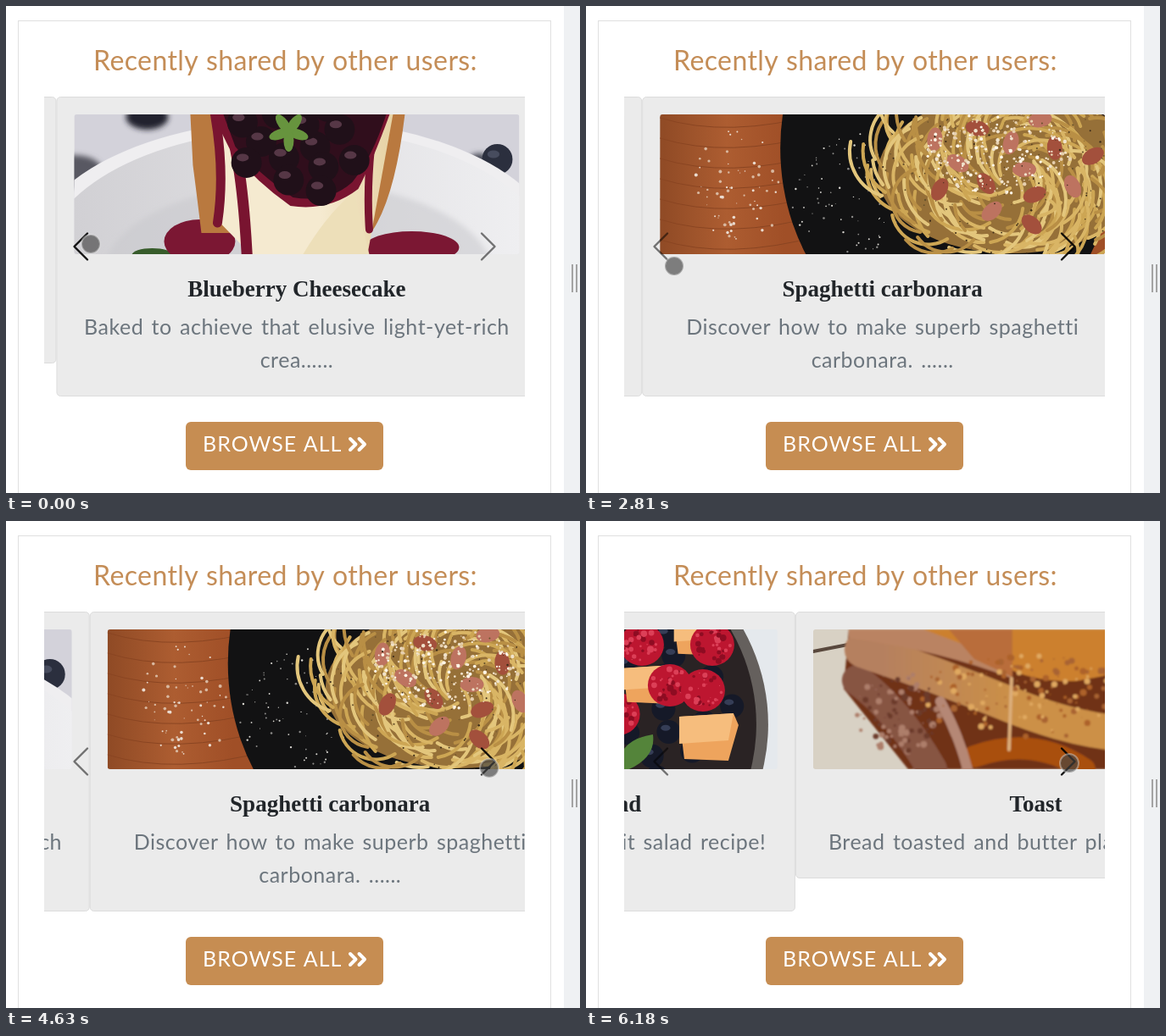
Animation of 677 by 575 pixels, one loop 6260 ms. Source, as an HTML page:

```html
<!DOCTYPE html>
<html lang="en">
<head>
<meta charset="utf-8">
<title>Recipe carousel</title>
<style>
  html, body { margin: 0; width: 100%; height: 100%; overflow: hidden; background: #fff; }
  svg { display: block; }
  text { font-family: Lato, sans-serif; }
  .middle { text-anchor: middle; }
  .heading { font-size: 32px; letter-spacing: .4px; word-spacing: 1px; fill: #c48d57; }
  .title { font: bold 27px "Liberation Serif", serif; fill: #212529; }
  .line { font-size: 25px; letter-spacing: .5px; word-spacing: 2.5px; fill: #6c757d; }
  .browse { font-size: 25px; letter-spacing: 1px; word-spacing: 1px; fill: #fff; }
  .chevron { fill: none; stroke: #000; stroke-width: 2.4; stroke-linecap: round; stroke-linejoin: round; }
</style>
</head>
<body>
<svg width="677" height="575" viewBox="0 0 677 575">
  <defs>
    <clipPath id="photo"><rect width="525" height="165" rx="3"/></clipPath>
    <filter id="soft"><feGaussianBlur stdDeviation="3"/></filter>
    <filter id="slight"><feGaussianBlur stdDeviation="1.2"/></filter>
    <linearGradient id="plate"><stop stop-color="#cfced2"/><stop offset="1" stop-color="#f1f1f3"/></linearGradient>
    <linearGradient id="cream"><stop offset=".6" stop-color="#f5ead0"/><stop offset="1" stop-color="#e6d2a4"/></linearGradient>
    <linearGradient id="wood"><stop stop-color="#8f4a25"/><stop offset=".15" stop-color="#ad5d31"/><stop offset=".28" stop-color="#a04f27"/></linearGradient>
    <linearGradient id="bread" gradientUnits="userSpaceOnUse" x2="400"><stop offset=".2" stop-color="#b5805f"/><stop offset=".6" stop-color="#cc9047"/></linearGradient>
  </defs>
  <rect x="658" width="19" height="575" fill="#eff1f3"/>
  <path d="M668 305v33M673 305v33" stroke="#a3a3a3" stroke-width="2"/>
  <rect id="panel" x="14.5" y="17.5" width="628" fill="none" stroke="#e0e0e0"/>
  <text class="heading middle" x="329.5" y="76">Recently shared by other users:</text>
  <svg id="carousel" x="45" y="107" width="567" height="354"></svg>
  <path id="prev" class="chevron" d="M96 268.500l-15.500 15.500 15.500 15.500"/>
  <path id="next" class="chevron" d="M561 268.500l15.500 15.500-15.500 15.500"/>
  <g id="button">
    <rect x="212" y="491" width="233" height="57" rx="6" fill="#c68d52"/>
    <text class="browse" x="232" y="526">BROWSE ALL</text>
    <path d="M406 511l6.500 6.500-6.500 6.500m10.500-13l6.500 6.500-6.500 6.500" fill="none" stroke="#fff" stroke-width="4" stroke-linecap="round" stroke-linejoin="round"/>
  </g>
  <circle id="cursor" r="11" fill="#444" fill-opacity=".66" stroke="#e8e8e8" stroke-opacity=".4" stroke-width="2"/>
</svg>
<script>
const LOOP = 6260, WIDTH = 567, SLIDE = 600;
const byId = id => document.getElementById(id);

let seed = 7;
const random = () => (seed = seed * 16807 % 2147483647) / 2147483647;
const between = (a, b) => a + random() * (b - a);
const pick = list => list[Math.floor(random() * list.length)];
const repeat = (n, make) => Array.from({ length: n }, (_, i) => make(i)).join('');

const backdrop = fill => `<rect width="525" height="165" fill="${fill}"/>`;
const shape = (d, fill) => `<path d="${d}" fill="${fill}"/>`;
const stroke = (d, color, width) =>
  `<path d="${d}" fill="none" stroke="${color}" stroke-width="${width}" stroke-linecap="round"/>`;
const oval = (x, y, rx, ry, fill, extra = '') =>
  `<ellipse cx="${x.toFixed(1)}" cy="${y.toFixed(1)}" rx="${rx}" ry="${ry}" fill="${fill}" ${extra}/>`;
const blurred = markup => `<g filter="url(#soft)">${markup}</g>`;

// Calls draw(x, y, i) at n random places in an ellipse
const scatter = (n, cx, cy, rx, ry, draw) => repeat(n, i => {
  const angle = between(0, 2 * Math.PI), reach = Math.sqrt(random());
  return draw(cx + Math.cos(angle) * reach * rx, cy + Math.sin(angle) * reach * ry, i);
});
// The same, evenly spread along a sunflower spiral
const spread = (n, cx, cy, rx, ry, draw) => repeat(n, i => {
  const reach = Math.sqrt((i + .5) / n);
  return draw(cx + Math.cos(i * 2.4) * reach * rx, cy + Math.sin(i * 2.4) * reach * ry, i);
});
const speck = (colors, size) => (x, y) => {
  const r = between(.5, size).toFixed(1);
  return oval(x, y, r, r, pick(colors));
};
const berry = (fill, shine, r) => (x, y) =>
  oval(x, y, r, r, fill) + oval(x - r / 4, y - r / 3, r * .4, r * .25, shine, 'opacity=".6"');

function cheesecake() {
  return backdrop('#d3d2da')
    + blurred(oval(86, 3, 25, 15, '#20222e') + oval(0, 68, 34, 20, '#595962') + oval(478, 60, 16, 14, '#4c4e5a'))
    + berry('#2b2f3e', '#5a6074', 18)(499, 53)
    + oval(260, 166, 312, 160, '#efeef0') + oval(264, 174, 300, 157, 'url(#plate)')
    + blurred(oval(264, 190, 230, 110, '#c9c8cd', 'opacity=".55"'))
    + oval(92, 166, 24, 8, '#375c2b')
    + oval(148, 150, 42, 26, '#7b1733') + oval(398, 157, 56, 19, '#7b1733')
    + shape('M137 0H390Q378 100 350 140H150Q144 90 140 60Z', '#b9793f')
    + shape('M164 0H376L346 165H208L174 130Z', 'url(#cream)')
    + shape('M270 165Q300 115 330 92L348 165Z', '#eddfb9')
    + stroke('M166 0Q178 70 169 128', '#791430', 11) + stroke('M190 40Q200 90 204 170', '#791430', 13)
    + stroke('M350 40Q345 90 348 136', '#791430', 9)
    + shape('M163 0H372Q352 55 335 88 300 115 255 108 215 80 184 42Z', '#791430')
    + shape('M176 0H368Q352 50 328 80 300 105 258 98 215 68 190 38Z', '#300e1c')
    + spread(13, 268, 38, 82, 58, berry('#201019', '#7b5264', 18))
    + repeat(5, i => oval(264, 20, 13, 6, '#67943e', `transform="rotate(${i * 72 + 18} 253 20)"`));
}

function spaghetti() {
  const noodle = (x, y) => {
    const turn = Math.atan2(y - 70, x - 415) + 1.57 + between(-.6, .6), length = between(30, 75), bend = between(35, 65);
    return stroke(`M${x.toFixed()} ${y.toFixed()}a${bend.toFixed()} ${bend.toFixed()} 0 0 1 ${(Math.cos(turn) * length).toFixed()} ${(Math.sin(turn) * length).toFixed()}`,
      pick(['#d9b565', '#e3c67c', '#b98f45', '#cda654']), 4);
  };
  const bacon = (x, y, i) => oval(x, y, 14, 9, i % 2 ? '#a3503c' : '#bd7360', `transform="rotate(${i * 53} ${x} ${y})"`);
  return backdrop('url(#wood)')
    + repeat(9, i => stroke(`M0 ${i * 24 - 20}q80 25 190 -5`, '#8a4522', 1))
    + scatter(65, 95, 85, 55, 70, speck(['#eadbcf', '#d8b8a0'], 2))
    + oval(340, 40, 198, 236, '#121213')
    + scatter(90, 225, 95, 70, 75, speck(['#8b8a88', '#d8d6d0'], 1.3))
    + oval(415, 70, 158, 94, '#967038') + scatter(230, 415, 70, 164, 98, noodle)
    + spread(14, 410, 65, 105, 75, bacon)
    + scatter(260, 400, 45, 85, 50, speck(['#f0e2cb', '#e6cfae', '#fff6e7'], 2.2))
    + scatter(110, 415, 75, 155, 90, speck(['#3b2b18', '#67512b'], 1.2));
}

function fruitSalad() {
  const melon = (x, y, size = 1) => `<g transform="translate(${x} ${y}) scale(${size})">`
    + shape('M-34 -24L30 -28 36 -14 24 28 -28 26Z', '#eea45d') + shape('M-34 -24L30 -28 24 4 -34 8Z', '#f6bd7d') + '</g>';
  const raspberry = (x, y) => oval(x, y, 26, 25, '#bd1630')
    + scatter(30, x, y, 22, 21, speck(['#dc3f57', '#8e0c22'], 4));
  return backdrop('#e5e9ed')
    + oval(260, 112, 254, 240, '#65605d') + oval(260, 112, 240, 230, '#2a2324')
    + spread(60, 260, 85, 220, 110, berry('#151928', '#4b5675', 14))
    + melon(52, 32, .75) + melon(110, 15) + melon(48, 112, .95)
    + spread(9, 250, 75, 95, 75, (x, y, i) => i % 2 ? melon(x, y, .8) : raspberry(x, y))
    + melon(370, 65, .8) + melon(430, 8, .8) + melon(443, 127)
    + raspberry(88, 145) + raspberry(365, 18) + raspberry(398, 66) + raspberry(437, 72) + raspberry(448, 18)
    + shape('M335 165Q338 130 378 124 382 150 350 165Z', '#54843a');
}

function toast() {
  return backdrop('#d8d1c4')
    + stroke('M0 26L46 17', '#59483d', 4)
    + '<g filter="url(#slight)">'
    + shape('M42 0H525L518 62 480 100 440 165H112L36 70Z', '#6f3119')
    + stroke('M52 60Q100 95 140 165', '#875443', 36)
    + stroke('M190 150Q260 125 320 165', '#a9500f', 26)
    + stroke('M380 160Q450 130 470 110', '#7c4a38', 34)
    + stroke('M58 24Q150 55 230 88T378 124', 'url(#bread)', 42)
    + stroke('M390 74Q450 70 500 38', '#d69b45', 46)
    + shape('M42 0H205L235 58Q150 25 42 10Z', '#ba8362')
    + shape('M130 0H456Q430 42 310 61 240 63 205 28Z', '#cc802f')
    + shape('M160 0H235V56L190 35Z', '#b96d3a')
    + shape('M456 0H525V14L430 30Z', '#cc943f')
    + stroke('M150 85Q172 125 182 165', '#b58774', 12)
    + stroke('M234 58L231 142', '#dcae7a', 4)
    + scatter(150, 250, 80, 130, 50, speck(['#ad6229', '#e0a960', '#a96431'], 4))
    + scatter(120, 430, 45, 85, 35, speck(['#eab75d', '#b56d25', '#d9a65a'], 3))
    + scatter(110, 100, 100, 50, 50, speck(['#6c3b2c', '#ad7e6a'], 4))
    + scatter(70, 430, 130, 45, 26, speck(['#5f3124', '#a97863'], 4)) + '</g>';
}

const cards = [
  { title: 'Toast', lines: ['Bread toasted and butter placed on top....'], photo: toast, height: 315 },
  { title: 'Blueberry Cheesecake', lines: ['Baked to achieve that elusive light-yet-rich', 'crea......'], photo: cheesecake },
  { title: 'Spaghetti carbonara', lines: ['Discover how to make superb spaghetti', 'carbonara. ......'], photo: spaghetti },
  { title: 'Fresh Fruit Salad', lines: ['You can’t beat this fresh fruit salad recipe!', '......'], photo: fruitSalad }
];
byId('carousel').innerHTML = cards.map(({ title, lines, photo, height = 354 }) => `<g>
  <rect x=".5" y=".5" width="566" height="${height - 1}" rx="4.5" fill="#ebebeb" stroke="#dcdcdc"/>
  <g transform="translate(21 21)" clip-path="url(#photo)">${photo()}</g>
  <text class="title middle" x="283.5" y="236">${title}</text>
  ${lines.map((line, i) => `<text class="line middle" x="283.5" y="${281 + i * 39}">${line}</text>`).join('')}
</g>`).join('');
const cardNodes = [...byId('carousel').children];

// Each tap slides one card on (1) or back (-1)
let shown = 1;
const slides = [[-67, -1], [1089, 1], [2293, 1], [3215, -1], [4160, 1], [5033, 1], [5830, 1]].map(([start, step]) => {
  const from = shown;
  shown = (shown + step + cards.length) % cards.length;
  return { start, step, from, to: shown };
});

// Pointer moves: start, end, x, y
const moves = [
  [80, 630, 563, 297], [720, 950, 571, 271], [1120, 1740, 568, 291], [2320, 2810, 104, 307],
  [2810, 3080, 93, 285], [3250, 3870, 570, 302], [3960, 4040, 570, 295], [4210, 5250, 570, 286]
];

const clamp = v => Math.min(1, Math.max(0, v));
const smooth = v => v * v * (3 - 2 * v);
const mix = (a, b, k) => a + (b - a) * k;

// cubic-bezier(.42, 0, .58, 1)
function easeInOut(x) {
  let low = 0, high = 1;
  for (let i = 0; i < 24; i++) {
    const s = (low + high) / 2;
    if (1.26 * s * (1 - s) ** 2 + 1.74 * s * s * (1 - s) + s ** 3 < x) low = s; else high = s;
  }
  return smooth(low);
}

function pointerAt(t) {
  return moves.reduce(([x, y], [start, end, toX, toY]) => {
    const k = smooth(clamp((t - start) / (end - start)));
    return [mix(x, toX, k), mix(y, toY, k)];
  }, [100, 281]);
}

function draw(t) {
  const index = slides.findLastIndex(slide => slide.start <= t);
  const { start, step, from, to } = slides[index];
  const elapsed = t - start, done = elapsed >= SLIDE;
  const progress = done ? 1 : easeInOut(elapsed / SLIDE);
  cardNodes.forEach((node, i) => {
    node.style.display = i === to || (i === from && !done) ? '' : 'none';
    const x = step * WIDTH * (i === to ? 1 - progress : -progress);
    node.setAttribute('transform', `translate(${x.toFixed(2)} 0)`);
  });

  // The short card pulls the page below it up
  const lift = done ? 354 - (cards[to].height ?? 354) : 0;
  byId('button').setAttribute('transform', `translate(0 ${-lift})`);
  byId('panel').setAttribute('height', 561 - lift);

  // The arrow tapped last is darker
  const focus = mix(slides[index - 1]?.step ?? step, step, clamp(elapsed / 150));
  byId('prev').style.opacity = .72 - .2 * focus;
  byId('next').style.opacity = .72 + .2 * focus;

  byId('cursor').setAttribute('transform', `translate(${pointerAt(t).map(v => v.toFixed(1)).join(' ')})`);
}

const origin = performance.now();
function play() {
  draw(Math.max(0, performance.now() - origin) % LOOP);
  requestAnimationFrame(play);
}
play();
</script>
</body>
</html>
```
